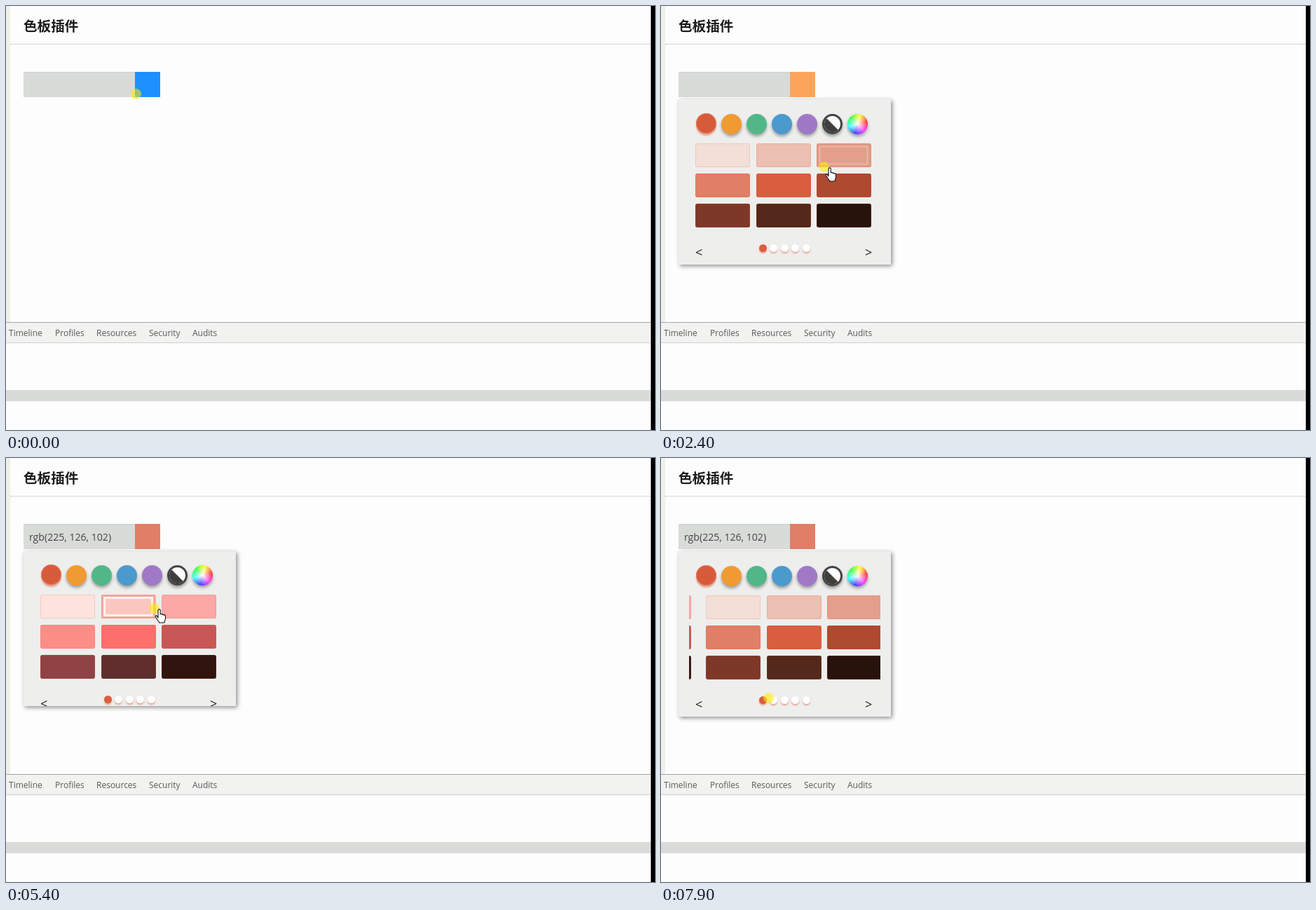
An HTML page for the animation above (8000 ms loop, 926 px wide and 605 px high).

```html
<!DOCTYPE html>
<html lang="zh">
<head>
<meta charset="utf-8">
<title>色板插件</title>
<style>
  html, body { margin: 0; width: 100%; height: 100%; overflow: hidden; background: #fdfdfd; }
  body { position: relative; font-family: "Open Sans", "Noto Sans", sans-serif; color: #444; }
  div, span, svg, h1 { position: absolute; box-sizing: border-box; white-space: nowrap; }
  .edge { left: 0; top: 0; width: 6px; height: 451px; background: #f0f0e9; }
  .side { left: 920px; top: 0; width: 6px; height: 605px; background: #000; }
  h1 { left: 25px; top: 0; margin: 0; font: bold 19.6px/55px "Noto Sans CJK SC", "Noto Sans CJK", sans-serif; color: #1c1c1c; }
  .rule { left: 6px; top: 54px; width: 914px; border-top: 1px dotted #b4b4b4; }
  .tools { left: 0; top: 451px; width: 920px; height: 30px; background: #f2f3f1;
    border-top: 1px solid #a6a6ac; border-bottom: 1px solid #cfcfcf; font-size: 12px; line-height: 29px; color: #585858; }
  .bar { left: 0; top: 548px; width: 920px; height: 16px; background: #d9dbd8; }
  #field { left: 25px; top: 94px; width: 159px; height: 36px; padding-left: 8px; background: #d9dbd9;
    border-top: 1px solid #cbd2d8; font-size: 14.1px; line-height: 35px; }
  #swatch { left: 184px; top: 94px; width: 36px; height: 36px; }
  #panel { left: 25px; top: 133px; width: 303px; overflow: hidden; background: #eeeeed; box-shadow: 2px 2px 6px rgba(0,0,0,.45); }
  #content { left: 0; top: 0; width: 303px; height: 236px; }
  .hue { top: 21px; width: 29px; height: 29px; border-radius: 50%; box-shadow: 0 3px 4px rgba(0,0,0,.35); }
  .hue:first-child { top: 20px; box-shadow: 0 3px 2px rgba(217,94,64,.5), inset 0 0 0 1px #e17e66; }
  .view { left: 15px; top: 55px; width: 273px; height: 136px; overflow: hidden; }
  .page { left: 0; top: 8px; width: 272px; height: 120px; }
  .cell { width: 78px; height: 34px; border-radius: 3px; box-shadow: inset 0 0 0 1px rgba(217,94,64,.18); }
  #frame { width: 71px; height: 28px; border: 3px solid #fff; box-shadow: 0 0 0 3px rgba(217,94,64,.35); }
  .dot { top: 207px; width: 11px; height: 11px; border-radius: 50%; box-shadow: 0 2px 2px rgba(217,94,64,.5); }
  .arrow { top: 208px; font-size: 18px; line-height: 20px; color: #222; }
  #glow { width: 15px; height: 15px; margin: -7.5px; border-radius: 50%; background: rgba(255,235,0,.58); }
  #cursor { width: 20px; height: 24px; overflow: visible; fill: #fff; stroke: #111; stroke-width: 1.1; stroke-linejoin: round; }
</style>
</head>
<body>
<div class="edge"></div>
<h1>色板插件</h1>
<div class="rule"></div>
<div id="field"></div>
<div id="swatch"></div>
<div id="panel"><div id="content"></div></div>
<div class="tools"></div>
<div class="bar"></div>
<div class="side"></div>
<div id="glow"></div>
<svg id="cursor"><path/></svg>

<script>
const $ = id => document.getElementById(id);
const add = (parent, className, style = {}, text = '') => {
  const node = document.createElement(text ? 'span' : 'div');
  node.className = className;
  node.textContent = text;
  Object.assign(node.style, style);
  return parent.appendChild(node);
};
const px = n => n + 'px';

const LOOP = 8000, PAGE = 272, COLUMN = 86.67, ROW = 43;
const ACCENT = 'rgb(217, 94, 64)', PICKED = 'rgb(225, 126, 102)';

const tabs = { Timeline: 4, Profiles: 70, Resources: 129, Security: 204, Audits: 266 };
for (const name in tabs) add(document.querySelector('.tools'), 'tab', { left: px(tabs[name]) }, name);

const hues = ['#d75b3a', '#f09a34', '#51b788', '#4a9acd', '#9f79c6',
  'linear-gradient(45deg, #403f3c 49%, #fff 51%) padding-box',
  'radial-gradient(#fff, #fff0 70%), conic-gradient(from 75deg, #f33, #f3f, #33f, #3ff, #3f3, #ff3, #f33)'];
hues.forEach((background, i) =>
  add($('content'), 'hue', { left: px(24.5 + 36 * i), background, border: i === 5 ? '3px solid #444446' : '' }));

const view = add($('content'), 'view');
const palettes = [
  ['#fde2dd', '#fcc6c0', '#fba8a6', '#fb8f88', '#fb706a', '#c85856', '#914245', '#5f2e2c', '#32140f'],
  ['#f2dfd6', '#ebbfb1', '#e39f8b', PICKED, ACCENT, '#ad4a30', '#7e3827', '#54281a', '#28130c']
];
const pages = palettes.map(colors => {
  const page = add(view, 'page');
  colors.forEach((background, i) =>
    add(page, 'cell', { left: px(9 + Math.round(COLUMN * (i % 3))), top: px(ROW * Math.floor(i / 3)), background }));
  return page;
});
const frame = add(view, '');
frame.id = 'frame';

const dots = [0, 1, 2, 3, 4].map(i => add($('content'), 'dot', { left: px(114.5 + 15.6 * i) }));
add($('content'), 'arrow', { left: '24px' }, '<');
add($('content'), 'arrow', { left: '266px' }, '>');

// Pointer shapes: offset from the highlight, then outline
const shapes = {
  none: [0, 0, ''],
  arrow: [0, -1, 'M.5.5v16l3.7-3.5 2.6 6 2.4-1-2.6-5.8h5z'],
  hand: [1, 1, 'M5 13V2.5a1.6 1.6 0 0 1 3.2 0V8a1.5 1.5 0 0 1 2.6.6 1.4 1.4 0 0 1 2.4.8 1.3 1.3 0 0 1 2.3 1V14c0 2.5-1.5 3.5-1.5 6H6.5c0-2-3-4-5-8-1-2 1.2-2.6 2-1.4z'],
  grab: [3, 1, 'M4 10 2.5 4.5a1.3 1.3 0 0 1 2.5-.7L6 7V2a1.4 1.4 0 0 1 2.8 0v4.5L9.5 2a1.3 1.3 0 0 1 2.6.3V7l1.2-3a1.2 1.2 0 0 1 2.3.7L14.5 12c-.5 2-1.5 3-1.5 5.5H6C5.5 15 2 13 .8 10.5 .3 9 2.1 8.5 4 10z']
};

// time, x, y, pointer shape
const path = [
  [0, 185, 125, 'none'], [200, 185, 125, 'none'], [500, 118, 100, 'none'], [800, 205, 104, 'hand'],
  [1100, 205, 112, 'hand'], [1300, 200, 140, 'arrow'], [1600, 161, 173, 'hand'], [1900, 90, 172, 'hand'],
  [2300, 262, 215, 'hand'], [2600, 174, 258, 'hand'], [3000, 174, 256, 'hand'], [3300, 88, 260, 'hand'],
  [3600, 88, 262, 'hand'], [3700, 300, 300, 'arrow'], [4000, 398, 279, 'arrow'], [4300, 540, 220, 'arrow'],
  [4700, 215, 118, 'hand'], [5000, 205, 108, 'hand'], [5400, 211, 214, 'hand'], [5800, 240, 250, 'hand'],
  [6200, 153, 256, 'hand'], [6400, 153, 256, 'grab'], [6500, 146, 256, 'grab'], [6800, 60, 258, 'grab'],
  [6900, 64, 262, 'hand'], [7300, 150, 338, 'hand'], [7700, 146, 340, 'hand'], [7900, 153, 342, 'none']
];
// time, strip position
const scroll = [[0, -PAGE], [4100, -PAGE], [4200, 0], [6400, 0], [6500, -7], [6800, -93],
  [6900, -190], [7000, -243], [7200, -PAGE], [7800, -PAGE], [7900, 15 - PAGE]];

const clamp = v => Math.min(1, Math.max(0, v));
const keyAt = (keys, t) => keys.findLastIndex(key => key[0] <= t);
const tween = (keys, t, column = 1) => {
  const i = keyAt(keys, t), a = keys[i], b = keys[i + 1] || a;
  return a[column] + (b[column] - a[column]) * clamp((t - a[0]) / (b[0] - a[0] || 1));
};

function openness(t) {
  const grow = start => 1 - (1 - clamp((t - start) / 667)) ** 3;
  if (t >= 5000) return grow(5000);
  return t < 3700 ? grow(1000) : (1 - clamp((t - 3700) / 300)) ** 2;
}

function drawHover(x, y, active) {
  const left = x - 49 - Math.round(COLUMN * Math.floor((x - 49) / COLUMN));
  const top = y - 196 - ROW * Math.floor((y - 196) / ROW);
  const inside = active && x > 49 && x < 300 && y > 196 && y < 316;
  const edge = Math.min(left, 78 - left, top, 34 - top);
  frame.style.opacity = inside ? clamp(edge / 4) : 0;
  frame.style.left = px(x - left - 40 + 3);
  frame.style.top = px(y - top - 188 + 3);
}

function draw(time) {
  const t = Math.floor(time % LOOP / 100) * 100;
  const x = tween(path, t, 1), y = tween(path, t, 2);
  const open = openness(t), shift = tween(scroll, t);

  $('field').textContent = t < 2600 ? '' : t < 3500 ? ACCENT : PICKED;
  $('swatch').style.background = t < 1300 ? '#1e90ff' : t < 2600 ? '#fba55c' : t < 3500 ? ACCENT : PICKED;

  $('panel').style.display = open > 0 ? '' : 'none';
  $('panel').style.height = px(Math.round(236 * open));
  $('content').style.top = px(Math.round(-16 * (1 - open)));
  pages.forEach((page, i) => page.style.left = px(shift + PAGE * i));

  const current = t >= 6800 && t < 7900 ? 1 : 0;
  dots.forEach((dot, i) => dot.style.background = i === current ? ACCENT : '#fff');
  drawHover(x, y, open > .5 && (shift === 0 || shift === -PAGE));

  const [dx, dy, outline] = shapes[path[keyAt(path, t)][3]];
  Object.assign($('glow').style, { left: px(x), top: px(y) });
  Object.assign($('cursor').style, { left: px(x + dx), top: px(y + dy) });
  $('cursor').firstElementChild.setAttribute('d', outline);
}

const start = performance.now();
(function tick() {
  draw(performance.now() - start);
  requestAnimationFrame(tick);
})();
</script>
</body>
</html>
```
